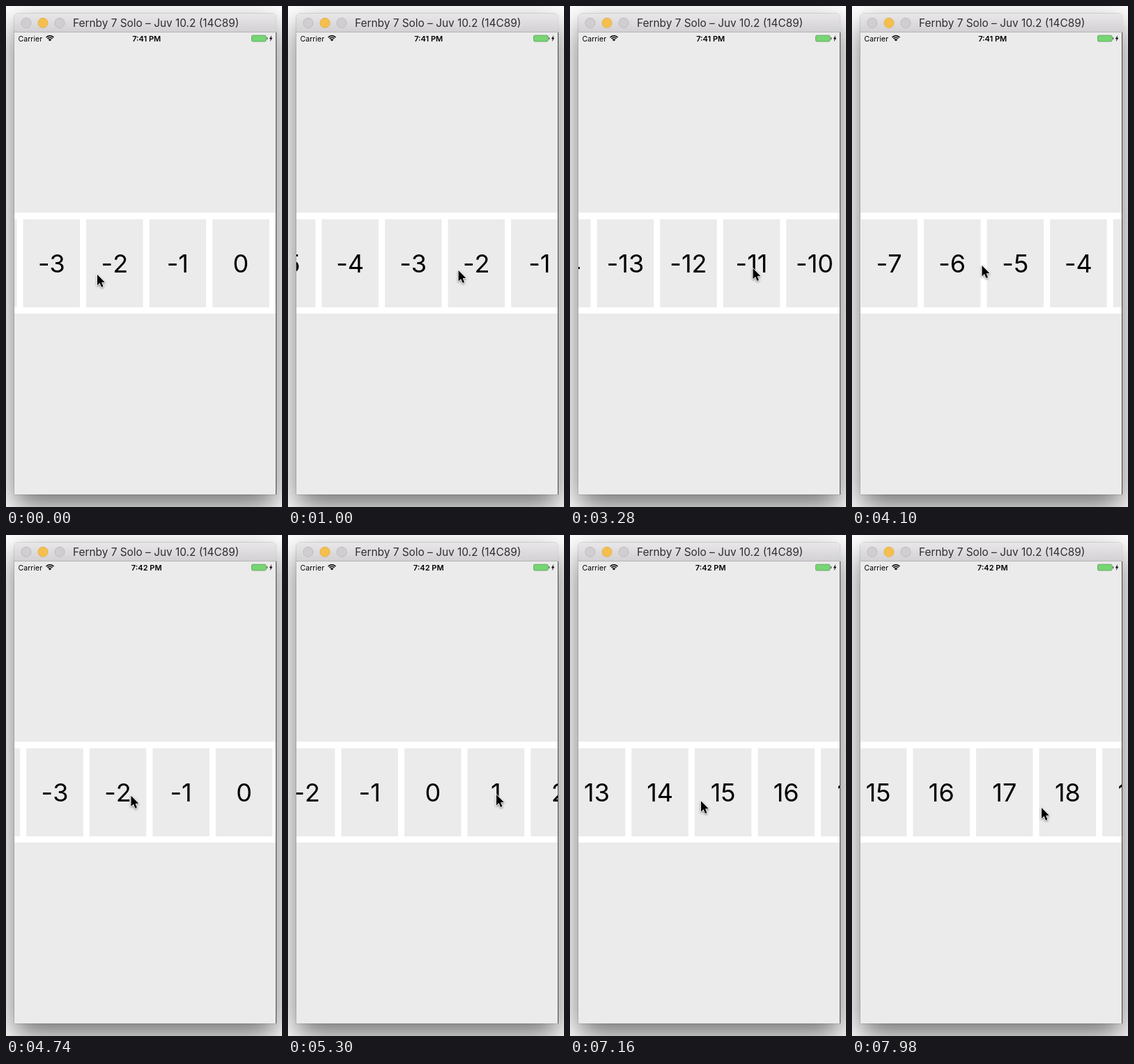
An HTML page with a canvas for the animation above (8 s loop, 396x720 px).

```html
<!DOCTYPE html>
<html lang="en">
<head>
<meta charset="utf-8">
<title>Endless card strip</title>
<style>
  html, body { margin: 0; width: 100%; height: 100%; overflow: hidden; background: #fff; }
  canvas { display: block; width: 396px; height: 720px; }
</style>
</head>
<body>
<canvas id="stage"></canvas>
<script>
const W = 396, H = 720, LOOP = 8000;
const WIN = { x: 12, y: 11, w: 375.5, h: 691, bar: 27 };
const CARD = { w: 81.5, pitch: 90.55, top: 306.5, h: 126.5 };
const GREY = '#ebebeb';
const FONT = 'Inter, Roboto, sans-serif';

const canvas = document.getElementById('stage');
const ctx = canvas.getContext('2d');
const dpr = window.devicePixelRatio || 1;
canvas.width = W * dpr;
canvas.height = H * dpr;

const EASE = {
  smooth: p => p * p * (3 - 2 * p),
  push: p => p * (0.55 + 0.45 * p),
  // Scroll view deceleration: speed falls by e every 500 ms
  fling: (p, ms) => (1 - Math.exp(-p * ms / 500)) / (1 - Math.exp(-ms / 500))
};

// Steps: [start, end, ease, ...values reached at the end]
const STRIP = { from: [296.2], steps: [
  [260, 740, 'smooth', 375],
  [920, 1120, 'push', 495],
  [1120, 1660, 'fling', 876],
  [1680, 1880, 'push', 1010],
  [1880, 3280, 'fling', 1215.8],
  [3300, 3500, 'push', 1084],
  [3500, 4100, 'fling', 646.3],
  [4100, 4220, 'smooth', 610],
  [4220, 4420, 'push', 480],
  [4420, 5300, 'fling', 167],
  [5360, 5560, 'push', 27],
  [5560, 6360, 'fling', -601.9],
  [6360, 6440, 'push', -625],
  [6440, 6640, 'push', -765],
  [6640, 7980, 'fling', -1361.3]
] };

const POINTER = { from: [131, 386], steps: [
  [260, 740, 'smooth', 209, 381],
  [920, 1120, 'push', 329, 378],
  [1180, 1640, 'smooth', 128.5, 371],
  [1680, 1880, 'push', 262, 374],
  [1900, 2300, 'smooth', 262.5, 377],
  [3300, 3500, 'push', 130, 375],
  [3700, 4100, 'smooth', 186.5, 373],
  [4100, 4220, 'smooth', 290, 373],
  [4220, 4420, 'push', 160, 375],
  [4600, 5200, 'smooth', 299, 373],
  [5360, 5560, 'push', 158, 376],
  [5900, 6360, 'smooth', 236, 376],
  [6360, 6440, 'push', 300, 375],
  [6440, 6640, 'push', 160, 379],
  [6900, 7700, 'smooth', 272, 392]
] };

function valueAt(track, t) {
  let now = track.from;
  for (const [start, end, ease, ...to] of track.steps) {
    if (t < start) break;
    const p = Math.min(1, (t - start) / (end - start));
    const k = EASE[ease](p, end - start);
    now = now.map((v, i) => v + (to[i] - v) * k);
  }
  return now;
}

function rect(x, y, w, h, fill) {
  ctx.fillStyle = fill;
  ctx.fillRect(x, y, w, h);
}

function shape(points, fill) {
  ctx.beginPath();
  points.forEach(([x, y]) => ctx.lineTo(x, y));
  ctx.closePath();
  ctx.fillStyle = fill;
  ctx.fill();
}

function text(str, x, y, font, align = 'left', fill = '#000') {
  ctx.font = font + ' ' + FONT;
  ctx.textAlign = align;
  ctx.fillStyle = fill;
  ctx.fillText(str, x, y);
}

// The sign is drawn apart from the digits, so the font does not raise it
function number(n, center, y) {
  const font = '400 36px';
  const digits = String(Math.abs(n));
  const sign = n < 0 ? '-' : '';
  ctx.font = font + ' ' + FONT;
  const signWidth = ctx.measureText(sign).width;
  const left = center - (signWidth + ctx.measureText(digits).width) / 2;
  text(sign, left, y, font);
  text(digits, left + signWidth, y, font);
}

function windowPath() {
  ctx.beginPath();
  ctx.roundRect(WIN.x, WIN.y, WIN.w, WIN.h, [5, 5, 0, 0]);
}

function drawWindow() {
  rect(0, 0, W, H, '#fff');
  ctx.save();
  ctx.shadowColor = 'rgba(0,0,0,.56)';
  ctx.shadowBlur = 42 * dpr;
  ctx.shadowOffsetY = 17 * dpr;
  windowPath();
  ctx.fillStyle = GREY;
  ctx.fill();
  ctx.restore();

  ctx.lineWidth = 1;
  ctx.strokeStyle = 'rgba(0,0,0,.22)';
  windowPath();
  ctx.stroke();
  ctx.fillStyle = GREY;
  ctx.fill();

  const bar = ctx.createLinearGradient(0, WIN.y, 0, WIN.y + WIN.bar);
  bar.addColorStop(0, '#e9e7e9');
  bar.addColorStop(1, '#d2d0d2');
  ctx.beginPath();
  ctx.roundRect(WIN.x, WIN.y, WIN.w, WIN.bar, [5, 5, 0, 0]);
  ctx.fillStyle = bar;
  ctx.fill();
  rect(WIN.x, 37, WIN.w, 1, '#b5b2b5');

  [['#d1ced1', '#bebbbe'], ['#f5bf4f', '#e6b24a'], ['#d1ced1', '#bebbbe']].forEach(([fill, edge], i) => {
    ctx.beginPath();
    ctx.arc(29 + 24 * i, 24.3, 7, 0, 7);
    ctx.fillStyle = fill;
    ctx.fill();
    ctx.strokeStyle = edge;
    ctx.stroke();
  });
  text('Fernby 7 Solo – Juv 10.2 (14C89)', 96, 30, '400 15.4px', 'left', '#2e2e2e');
}

function drawStatus(t) {
  text('Carrier', 17.5, 50.5, '400 10.6px');
  text(t < 4700 ? '7:41 PM' : '7:42 PM', 201.7, 50.5, '600 11px', 'center');

  ctx.strokeStyle = '#000';
  ctx.lineWidth = 1.5;
  for (const r of [4.6, 7.2]) {
    ctx.beginPath();
    ctx.arc(63, 50, r, -Math.PI * 0.77, -Math.PI * 0.23);
    ctx.stroke();
  }
  ctx.beginPath();
  ctx.moveTo(63, 50.5);
  ctx.arc(63, 50.5, 3.1, -Math.PI * 0.77, -Math.PI * 0.23);
  ctx.fillStyle = '#000';
  ctx.fill();

  ctx.beginPath();
  ctx.roundRect(352.5, 42.2, 20.6, 8.8, 1.8);
  ctx.fillStyle = '#76d672';
  ctx.fill();
  ctx.lineWidth = 0.8;
  ctx.strokeStyle = '#5a9a58';
  ctx.stroke();
  rect(374, 45, 1.2, 3.2, '#555');
  shape([[381.2, 42], [377.8, 47.2], [379.8, 47.2], [378.8, 51.2], [382.3, 45.8], [380.3, 45.8]], '#000');
}

function drawStrip(t) {
  const [zero] = valueAt(STRIP, t);
  ctx.save();
  ctx.beginPath();
  ctx.rect(WIN.x, 38, WIN.w, 664);
  ctx.clip();
  rect(WIN.x, 297, WIN.w, 145, '#fff');
  const first = Math.floor((WIN.x - zero) / CARD.pitch);
  for (let n = first; n < first + 6; n++) {
    const x = zero + n * CARD.pitch;
    rect(x, CARD.top, CARD.w, CARD.h, GREY);
    number(n, x + CARD.w / 2, 383);
  }
  ctx.restore();
  rect(387, 38, 1, 664, '#4a4a4a');
}

function drawPointer(t) {
  const [x, y] = valueAt(POINTER, t);
  const arrow = [[0, 0], [0, 15.4], [3.5, 12.1], [6, 18], [8.5, 16.9], [6.1, 11.2], [10.8, 11]];
  ctx.save();
  ctx.translate(x, y);
  ctx.shadowColor = 'rgba(0,0,0,.35)';
  ctx.shadowBlur = 3 * dpr;
  ctx.shadowOffsetY = 1.2 * dpr;
  shape(arrow, '#000');
  ctx.lineWidth = 1.6;
  ctx.lineJoin = 'round';
  ctx.strokeStyle = '#fff';
  ctx.stroke();
  ctx.shadowColor = 'transparent';
  shape(arrow, '#000');
  ctx.restore();
}

function draw(now) {
  const t = now % LOOP;
  ctx.setTransform(dpr, 0, 0, dpr, 0, 0);
  drawWindow();
  drawStatus(t);
  drawStrip(t);
  drawPointer(t);
}

function frame() {
  draw(performance.now() - begin);
  requestAnimationFrame(frame);
}

const begin = performance.now();
frame();
</script>
</body>
</html>
```
